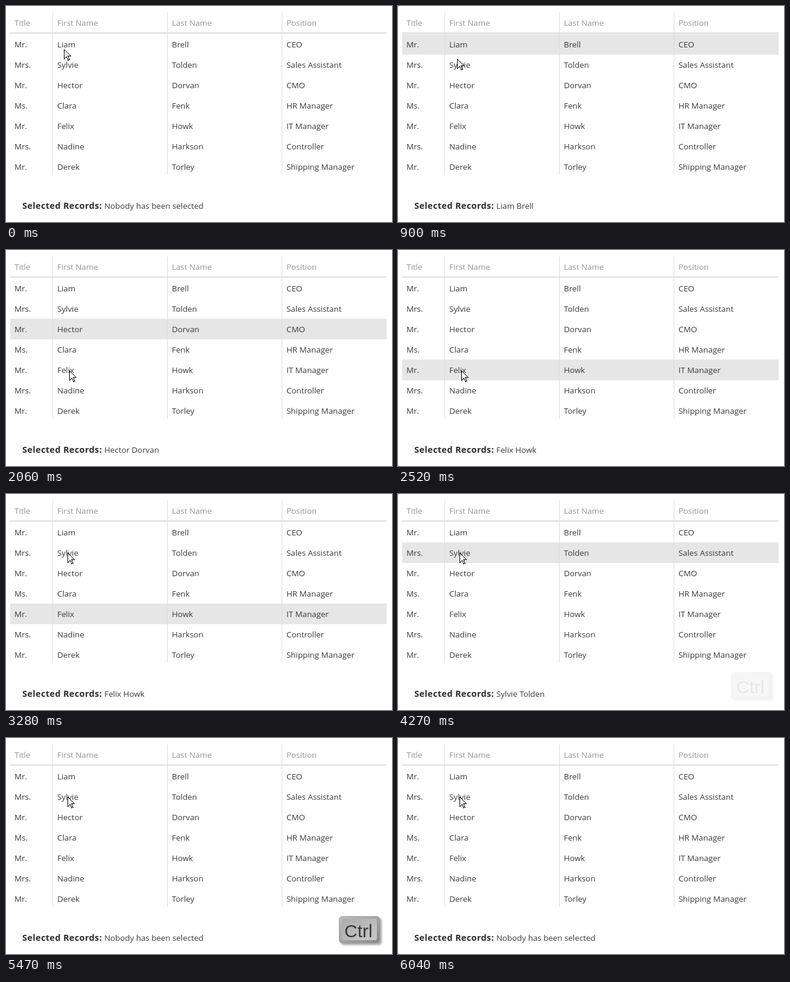
Write an HTML page that moves like this. It is 640x360 px and loops after 6.07 s.

```html
<!DOCTYPE html>
<html lang="en">
<head>
<meta charset="utf-8">
<title>Row selection</title>
<style>
  html, body { margin: 0; width: 100%; height: 100%; overflow: hidden; background: #fff; }
  svg { display: block; width: 640px; height: 360px; font: 13.35px "Open Sans", sans-serif; fill: #3a3a3a; }
  .head { fill: #959595; }
  .label { font-size: 14.6px; font-weight: 700; letter-spacing: .3px; fill: #2c2c2c; }
  .key text { font: 30px "Liberation Sans", Arial, sans-serif; fill: #111; }
</style>
</head>
<body>
<svg viewBox="0 0 640 360">
  <defs>
    <linearGradient id="side" x2="1" y2="1">
      <stop stop-color="#b4b4b4"/><stop offset="1" stop-color="#6f6f6f"/>
    </linearGradient>
    <linearGradient id="face" x2="1" y2="1">
      <stop stop-color="#9c9c9c"/><stop offset="1" stop-color="#bcbcbc"/>
    </linearGradient>
    <filter id="blur"><feGaussianBlur stdDeviation="1.5"/></filter>
  </defs>
  <rect id="highlight" x="7" width="624" height="34.5" fill="#e6e6e6"/>
  <path d="M77.5 11V281M267.5 11V281M457.5 11V281" stroke="#ddd"/>
  <path d="M7 45H631" stroke="#ddd" stroke-width="2"/>
  <g id="table"></g>
  <text class="label" x="27" y="338">Selected Records:</text>
  <text id="status" x="163" y="338"></text>
  <g id="key" class="key">
    <rect x="555" y="300" width="68" height="45" rx="5" fill="#555" opacity=".6" filter="url(#blur)"/>
    <rect x="552.5" y="297.5" width="67" height="44" rx="5" fill="url(#side)" stroke="#868686"/>
    <rect x="557" y="301" width="58" height="36" rx="4" fill="url(#face)"/>
    <text x="561" y="332">Ctrl</text>
  </g>
  <path id="cursor" d="M.5 .5V16.5L4.5 12.5L7 18.5L9 17.5L6.8 11.8H11.5Z" fill="#fff" stroke="#000"
    shape-rendering="crispEdges"/>
</svg>
<script>
const LOOP = 6070, STEP = 30;
const COLUMNS = [14, 85, 275, 465];
const ROWS = [
  ["Title", "First Name", "Last Name", "Position"],
  ["Mr.", "Liam", "Brell", "CEO"],
  ["Mrs.", "Sylvie", "Tolden", "Sales Assistant"],
  ["Mr.", "Hector", "Dorvan", "CMO"],
  ["Ms.", "Clara", "Fenk", "HR Manager"],
  ["Mr.", "Felix", "Howk", "IT Manager"],
  ["Mrs.", "Nadine", "Harkson", "Controller"],
  ["Mr.", "Derek", "Torley", "Shipping Manager"],
];
// [time, selected row], 0 = none
const SELECTIONS = [[0, 0], [570, 1], [1430, 3], [2520, 5], [3510, 2], [5080, 0]];
// [start time, steps, x, y]
const MOVES = [[30, 1, 97, 72], [870, 12, 102, 133], [1760, 11, 105, 201], [2650, 22, 102, 98]];

const byId = id => document.getElementById(id);
const [highlight, table, status, key, cursor] =
  ["highlight", "table", "status", "key", "cursor"].map(byId);
const clamp = v => Math.min(1, Math.max(0, v));
const easeOut = p => 1 - (1 - p) ** 1.65;

table.innerHTML = ROWS.map((cells, row) => cells.map((cell, col) =>
  `<text x="${COLUMNS[col]}" y="${row ? 35 + 34 * row : 33}"${row ? "" : ' class="head"'}>${cell}</text>`
).join("")).join("");

function cursorAt(t) {
  let x = 96, y = 72;
  for (const [start, steps, toX, toY] of MOVES) {
    if (t < start) break;
    const p = easeOut(clamp((Math.floor((t - start) / STEP) + 1) / steps));
    x += (toX - x) * p;
    y += (toY - y) * p;
  }
  return [Math.round(x), Math.round(y)];
}

function keyOpacity(t) {
  if (t < 4270) return 0;
  const tick = 4270 + Math.floor((t - 4270) / STEP) * STEP;
  return clamp(Math.min((tick - 4200) / 730, (6040 - tick) / 690));
}

function draw(t) {
  const row = SELECTIONS.filter(([start]) => start <= t).pop()[1];
  highlight.setAttribute("visibility", row ? "visible" : "hidden");
  highlight.setAttribute("y", 12.5 + 34 * row);
  status.textContent = row ? `${ROWS[row][1]} ${ROWS[row][2]}` : "Nobody has been selected";
  key.setAttribute("opacity", keyOpacity(t));
  cursor.setAttribute("transform", `translate(${cursorAt(t)})`);
}

const origin = performance.now();
function tick() {
  draw((performance.now() - origin) % LOOP);
  requestAnimationFrame(tick);
}
tick();
</script>
</body>
</html>
```
